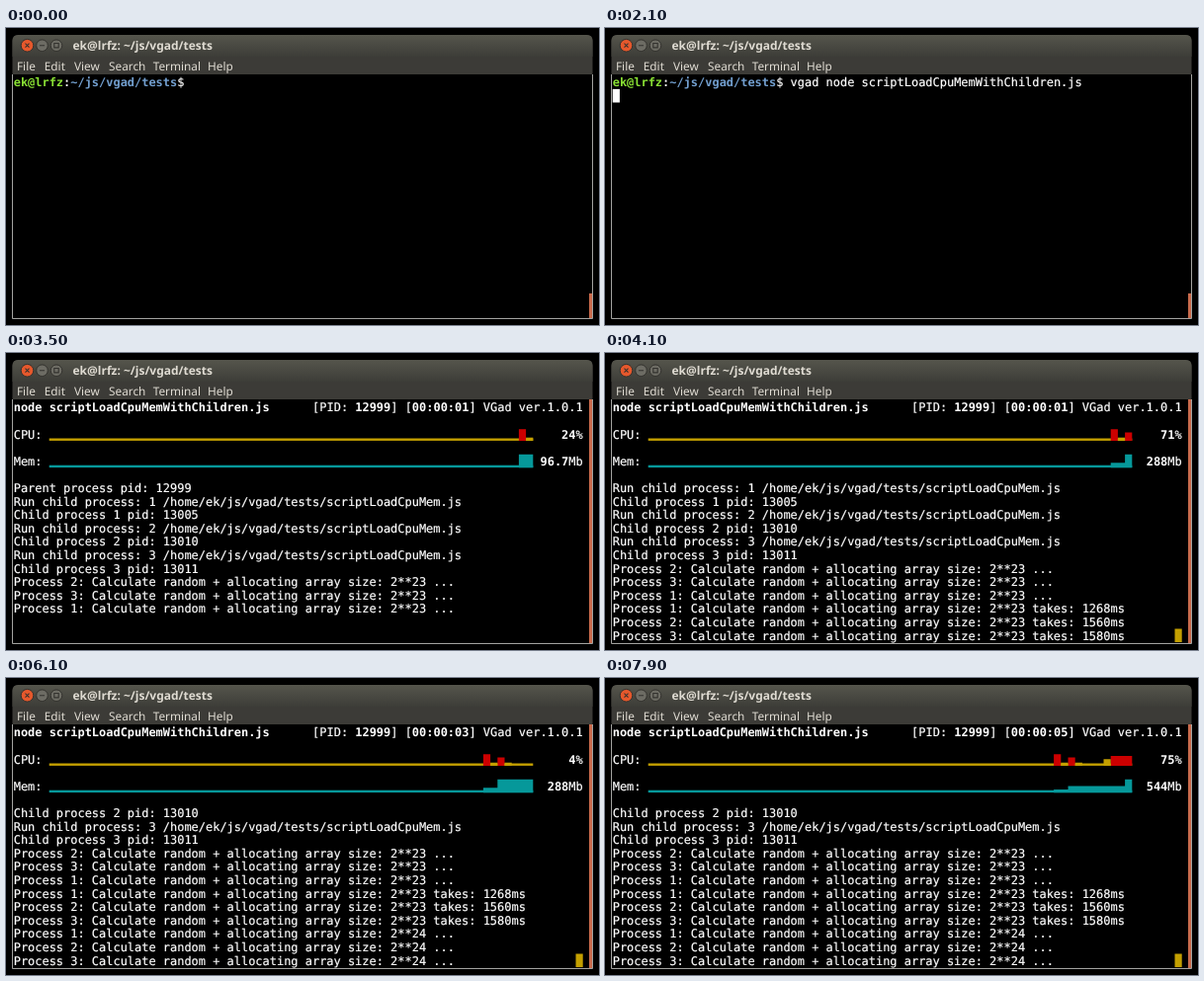
Animation of 600x301 px, one loop 8 s. Source, as an HTML page:

```html
<!DOCTYPE html>
<html lang="en">
<head>
<meta charset="utf-8">
<title>Terminal</title>
<style>
  html, body { margin: 0; width: 100%; height: 100%; overflow: hidden; background: #000; }
  svg { display: block; width: 100vw; height: 100vh; }
  text { white-space: pre; text-rendering: geometricPrecision; }
  .ui { font-family: "Noto Sans", sans-serif; font-size: 11.8px; fill: #dfdbd2; }
  .title { font-size: 12px; font-weight: bold; }
  #screen { font-family: "DejaVu Sans Mono", monospace; font-size: 11.96px; fill: #fff; }
  #screen text { stroke: #fff; stroke-width: 0.2px; }
  #screen .b { font-weight: bold; stroke: none; }
</style>
</head>
<body>
<svg viewBox="0 0 600 301">
  <defs>
    <linearGradient id="bar" x2="0" y2="1">
      <stop offset="0" stop-color="#55554c"/>
      <stop offset="1" stop-color="#3d3d38"/>
    </linearGradient>
  </defs>
  <rect width="600" height="301"/>
  <path d="M6.5 47V13q0-6 6-6H587.5q6 0 6 6V47Z" fill="#3c3b37"/>
  <path d="M6.5 29V13q0-6 6-6H587.5q6 0 6 6V29Z" fill="url(#bar)"/>
  <path d="M6.5 47V294.5H593.5V47" fill="none" stroke="#a3a3a0"/>
  <g stroke="#33322e">
    <circle cx="21.5" cy="17.7" r="6.3" fill="#e6582c"/>
    <circle cx="36.5" cy="17.7" r="5.8" fill="#6d6c64"/>
    <circle cx="51" cy="17.7" r="5.8" fill="#6d6c64"/>
    <path d="M19.5 15.7l4 4m0-4l-4 4M34 17.7h5M48.8 15.5h4.4v4.400h-4.400z" fill="none" stroke-width="1.1"/>
  </g>
  <text class="ui title" x="67.5" y="21.9">ek@lrfz: ~/js/vgad/tests</text>
  <g id="menu" class="ui"></g>
  <g id="screen"></g>
</svg>
<script>
const LOOP = 8000, X0 = 7.7, Y0 = 48.3, CW = 7.2, CH = 13.6;
const GREEN = '#8ae234', BLUE = '#729fcf', YELLOW = '#c4a000', RED = '#cc0000', TEAL = '#06989a';
const CHART_COL = 5, CHART_END = 73, LAST_COL = 80;
const APP = 'vgad', SCRIPT = 'scriptLoadCpuMemWithChildren.js';
const COMMAND = `${APP} node ${SCRIPT}`;

// [time, value] steps
const typed = [[0, 0], [200, 1], [500, 3], [600, 4], [700, 5], [1300, 7], [1400, 9], [1500, 10], [1900, COMMAND.length]];
const printed = [[0, 0], [2400, 3], [2500, 7], [2600, 10], [3800, 11], [4100, 13], [5800, 14], [6100, 16]];

const cpu = [88, 24, 71, 18, 0, 0, 4, 48, 76, 78, 75];
const mem = cpu.map((_, i) => i < 2 ? 96.7 : i < 10 ? 288 : 544);

const calc = (id, pow, end) => `Process ${id}: Calculate random + allocating array size: 2**${pow} ${end}`;
const log = ['Parent process pid: 12999'];
[13005, 13010, 13011].forEach((pid, i) => log.push(
  `Run child process: ${i + 1} /home/ek/js/${APP}/tests/scriptLoadCpuMem.js`,
  `Child process ${i + 1} pid: ${pid}`));
[2, 3, 1].forEach(id => log.push(calc(id, 23, '...')));
[1268, 1560, 1580].forEach((ms, i) => log.push(calc(i + 1, 23, `takes: ${ms}ms`)));
[1, 2, 3].forEach(id => log.push(calc(id, 24, '...')));

const at = (steps, t) => steps.reduce((v, s) => t >= s[0] ? s[1] : v, 0);
const px = col => X0 + col * CW;
const py = row => Y0 + row * CH;

const rect = (x, y, w, h, fill) =>
  `<rect x="${x.toFixed(2)}" y="${y.toFixed(2)}" width="${w.toFixed(2)}" height="${h.toFixed(2)}" fill="${fill}"/>`;
const block = (col, row, fill) => rect(px(col), py(row), CW, CH, fill);
const bold = (s, fill = '#fff') => `<tspan class="b" fill="${fill}">${s}</tspan>`;
const text = (col, row, s) =>
  `<text x="${px(col).toFixed(2)}" y="${(py(row) + 11.1).toFixed(2)}">${s}</text>`;

function prompt(t) {
  const n = at(typed, t);
  let out = text(0, 0, bold('ek@lrfz', GREEN) + ':' + bold(`~/js/${APP}/tests`, BLUE) + '$ ' + COMMAND.slice(0, n));
  if (t >= 2100) out += block(0, 1, '#fff');
  else if (t >= 100) out += block(25 + n, 0, '#fff');
  return out + rect(590, 269, 3, 25, '#c96a4c');
}

function chart(row, label, data, max, color, unit) {
  const bottom = py(row + 1);
  const value = String(data.length ? data[data.length - 1] : 0);
  const bars = {};
  // one path per colour, so that neighbouring bars join without seams
  data.forEach((v, i) => {
    const level = Math.floor(1 + v / max * 7);
    if (level < 2) return;
    const x = px(CHART_END - data.length + i), h = level * CH / 8;
    bars[color(v)] = (bars[color(v)] || '') + `M${x.toFixed(2)} ${bottom.toFixed(2)}v${-h}h${CW}v${h}z`;
  });
  return text(0, row, label)
    + rect(px(CHART_COL), bottom - 2.6, (CHART_END - CHART_COL) * CW, 2.4, color(0))
    + Object.entries(bars).map(([fill, d]) => `<path d="${d}" fill="${fill}"/>`).join('')
    + text(LAST_COL - value.length - unit.length, row, bold(value) + unit);
}

function monitor(t) {
  const ticks = Math.max(0, Math.floor((t - 2900) / 500) + 1);
  const secs = Math.max(0, Math.floor((t - 2400) / 1000));
  const used = mem.slice(0, ticks);
  const count = at(printed, t);
  let out = text(0, 0, bold(`node ${SCRIPT}`));
  out += text(42, 0, `[PID: ${bold('12999')}] [${bold('00:00:0' + secs)}] VGad ver.1.0.1`);
  out += chart(2, 'CPU:', cpu.slice(0, ticks), 100, v => v > 60 ? RED : YELLOW, '%');
  out += chart(4, 'Mem:', used, Math.max(1, ...used), () => TEAL, 'Mb');
  log.slice(Math.max(0, count - 12), count).forEach((s, i) => out += text(0, 6 + i, s));
  if (t >= 4100) out += block(LAST_COL - 1, 17, YELLOW);
  return out + rect(590, 47, 3, 247, '#c96a4c');
}

const screenEl = document.getElementById('screen');
let shown = '';
function draw(t) {
  const next = t < 2300 ? prompt(t) : monitor(t);
  if (next !== shown) screenEl.innerHTML = shown = next;
}

const menu = { File: 11, Edit: 38.8, View: 69, Search: 104, Terminal: 148.7, Help: 204 };
document.getElementById('menu').innerHTML =
  Object.entries(menu).map(([s, x]) => `<text x="${x}" y="42.6">${s}</text>`).join('');

const start = performance.now();
function tick() {
  draw((performance.now() - start) % LOOP);
  requestAnimationFrame(tick);
}
tick();
</script>
</body>
</html>
```
